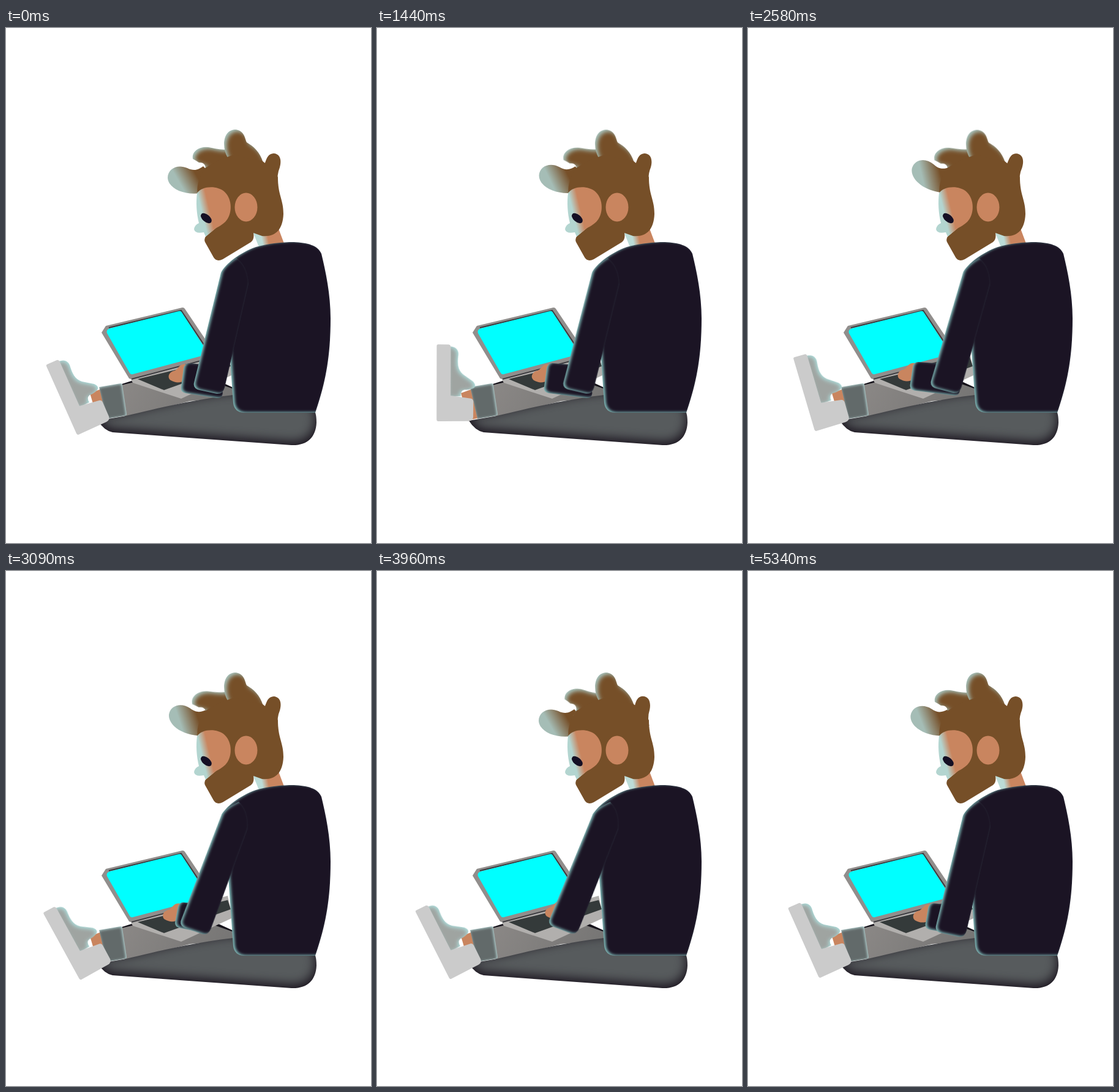
Recreate the animation shown at these times as an HTML page. Size 596x842 px, loop 5.37 s.

```html
<!DOCTYPE html>
<html lang="en">
<head>
<meta charset="utf-8">
<title>Man typing on a laptop</title>
<style>
  html, body { margin: 0; height: 100%; overflow: hidden; background: #fff; }
  svg { display: block; width: 100vw; height: 100vh; }
</style>
</head>
<body>
<svg viewBox="0 0 596 842">
  <defs id="defs">
    <linearGradient id="faceFill" gradientUnits="userSpaceOnUse" x1="307" x2="367" y1="300" y2="286">
      <stop offset=".2" stop-color="#b3d5d0"/><stop offset=".41" stop-color="#c9855f"/>
    </linearGradient>
    <linearGradient id="neckFill" gradientUnits="userSpaceOnUse" x1="406" x2="432" y1="348" y2="343">
      <stop offset=".45" stop-color="#bcdcd7"/><stop offset=".85" stop-color="#c9855f"/>
    </linearGradient>
    <linearGradient id="lockFill" gradientUnits="userSpaceOnUse" x1="275" x2="310" y1="255" y2="235">
      <stop offset=".2" stop-color="#a5bdb6"/><stop offset=".95" stop-color="#764f28"/>
    </linearGradient>
    <linearGradient id="shinFill" x2="1" y2=".2">
      <stop offset="0" stop-color="#8b8886"/><stop offset="1" stop-color="#777675"/>
    </linearGradient>
  </defs>

  <!-- legs -->
  <path fill="#15121a" d="M186 583L208 576H345L371 588V601H196Z"/>
  <path fill="url(#shinFill)" d="M188 584L209 579H340L371 590V603L300 610L194 637Z"/>
  <path fill="#575b5d" filter="url(#shade)" d="M150 642L196 634C240 624 300 608 371 600L500 620Q507 626 507 645C506 669 492 683 466 682L174 661Q160 658 150 642Z"/>
  <path fill="#c9855f" d="M137 597L156 590L165 638L150 641Z"/>
  <path fill="#626a6a" filter="url(#cuffGlow)" d="M152 587L187 581Q190 581 190 584L197 631Q197 634 194 634L164 639Z"/>
  <g id="foot">
    <path fill="#9fa4a1" filter="url(#shoeGlow)" d="M86 545Q99 540 104 551C108 564 112 574 124 578L144 582Q153 586 149 592Q143 598 137 600Q131 604 136 612L120 620Z"/>
    <path fill="#cbcbcb" d="M67 550L83 543Q86 542 88 546L120 618L152 609Q156 608 158 612L168 635Q170 641 164 644L118 665Q116 665 115 663L66 553Q65 551 67 550Z"/>
  </g>

  <!-- laptop -->
  <path fill="#b1afad" d="M204 575L362 531L370 567L286 606L207 580Z"/>
  <path fill="#343a3a" d="M215 574L362 538L367 553L258 592Z"/>
  <path fill="#918e8c" d="M163 487L288 457Q291 457 292 459L345 538L204 574L201 573L156 498Z"/>
  <path fill="none" stroke="#3c3c40" stroke-width="2" d="M205 574L345 537M168 490L286 462L334 534"/>
  <path fill="#0ff" d="M170 491L282 463Q285 462 287 465L331 533L207 566Q204 567 202 564L165 499Q163 493 170 491Z"/>

  <!-- body -->
  <path fill="url(#neckFill)" d="M403 333L445 328L454 352L413 358Z"/>
  <path fill="#1b1424" filter="url(#coatGlow)" d="M352 399C358 386 382 367 408 358C430 352 450 350 470 350C492 351 509 355 515 369C522 398 530 435 530 475C530 540 521 582 505 629H388Q373 628 371 613L363 500L368 440Z"/>
  <path id="hand" fill="#c9855f" d="M8 2C-2 0-4 8-10 12C-21 14-23 24-17 28C-8 33-2 32 8 28Z"/>
  <path id="sleeve" fill="#1b1424" filter="url(#coatGlow)"/>
  <path id="arm" fill="#1b1424" filter="url(#coatGlow)" d="M351 400Q356 389 376 376Q394 388 396 418L370 532L357 588Q354 599 344 598L316 592Q305 589 307 580Z"/>

  <!-- head -->
  <g fill="#764f28">
    <path id="lock1" fill="url(#lockFill)" d="M318 270C290 274 265 262 264 245C264 230 280 222 296 229C308 235 315 231 322 226L345 250Z"/>
    <path id="lock2" filter="url(#hairGlow)" d="M305 214C303 202 315 193 331 195C346 198 356 200 368 198L366 232L322 240C330 226 324 219 315 220Q309 216 305 214Z"/>
    <path id="lock3" filter="url(#hairGlow)" d="M362 212C352 195 354 167 374 166C389 167 390 180 393 187C405 194 414 202 420 220L398 235L370 220Z"/>
    <path id="lock4" d="M414 236C426 225 422 206 437 205C449 206 450 218 447 228Q442 240 444 254L420 256Z"/>
    <path d="M313 272C310 255 318 240 325 229L345 217L372 207L398 214L418 217L432 228L444 244C444 274 453 280 453 304C452 330 440 342 418 340L404 335Q406 345 400 350L354 378Q344 383 339 375L325 350Q323 345 326 341L345 325Z"/>
    <path fill="url(#faceFill)" d="M312 270C320 258 345 257 357 268C370 280 370 305 358 317Q350 324 343 327L326 341L323 334Q309 337 307 329Q308 322 315 319C311 303 310 285 312 270Z"/>
    <ellipse fill="#c9855f" cx="392" cy="293" rx="18.5" ry="23.5"/>
    <ellipse fill="#140f24" cx="327" cy="311" rx="10.5" ry="6" transform="rotate(40 327 311)"/>
  </g>
</svg>
<script>
const $ = id => document.getElementById(id);

// Soft coloured light or shade along the inside edge of a shape.
const glow = (id, color, blur, dx, dy) => `
  <filter id="${id}" x="-.3" y="-.5" width="1.6" height="2" color-interpolation-filters="sRGB">
    <feFlood flood-color="${color}"/>
    <feComposite operator="out" in2="SourceAlpha"/>
    <feGaussianBlur stdDeviation="${blur}"/>
    <feOffset dx="${dx}" dy="${dy}"/>
    <feComposite operator="atop" in2="SourceGraphic"/>
  </filter>`;
$('defs').insertAdjacentHTML('beforeend',
  glow('coatGlow', '#80bab8', 2.2, 2.8, -.6) +
  glow('hairGlow', '#a8c6c0', 3.5, 4, 3) +
  glow('shoeGlow', '#aee0de', 3, -2, 2) +
  glow('cuffGlow', '#c2e4e3', 2, -.8, .6) +
  glow('shade', '#140d18', 9, -1, -5));

const LOOP = 5370, STEP = 30;

const ease = u => {
  u = Math.min(1, Math.max(0, u));
  return u * u * (3 - 2 * u);
};

function draw(now) {
  const t = Math.floor(now % LOOP / STEP) * STEP;
  // Eases from 0 up to 1 at the peak and back to 0.
  const hump = (start, peak, end) =>
    ease((t - start) / (peak - start)) - ease((t - peak) / (end - peak));
  const turn = (id, angle, pivot) => $(id).setAttribute('transform', `rotate(${angle} ${pivot})`);

  // The foot taps forward, then drops a little past its rest.
  turn('foot', 31.5 * hump(0, 2100, 2890) - 4.8 * hump(2100, 2890, LOOP), '160 610');

  // Hair sways in overlapping gusts.
  turn('lock1', 17 * hump(900, 2550, 4000) + 14 * hump(4000, 4900, 6000), '320 250');
  turn('lock2', 6 * hump(3050, 4000, 4800) - 5 * (hump(0, 850, 2000) + hump(2000, 3050, 4000)), '348 225');
  turn('lock3', -6 * (hump(300, 840, 1350) + hump(1350, 2050, 2700) + hump(4000, 4550, 5250)), '432 200');
  turn('lock4', 3 * hump(2300, 2850, 3150) - 3 * hump(0, 850, 1500) - 5 * hump(3150, 4000, LOOP), '432 248');

  const swing = 1.7 * hump(0, 850, 2000) + Math.min(8.6, 11 * hump(2000, 3800, LOOP));
  turn('arm', swing, '368 408');

  // The forearm slides out from under the upper arm and lifts with it.
  const lift = 11 * hump(2070, 3960, 6500);
  const x = 286 + 4 * t / LOOP - 28 * hump(810, 2070, 3960) + 6 * hump(2900, 3960, LOOP);
  const top = 548 - lift, low = 597 - 2.2 * lift, elbow = 350 - 3 * swing;
  $('sleeve').setAttribute('d',
    `M${x + 13} ${top}L${elbow - 6} ${top + 4}L${elbow + 4} ${low}Q${elbow + 3} ${low + 9} ${elbow - 6} ${low + 8}` +
    `L${x + 7} ${low}Q${x - 2} ${low - 2} ${x} ${low - 11}L${x + 4} ${top + 8}Q${x + 6} ${top} ${x + 13} ${top}Z`);
  $('hand').setAttribute('transform', `translate(${x} ${top})`);
  requestAnimationFrame(draw);
}
requestAnimationFrame(draw);
</script>
</body>
</html>
```
